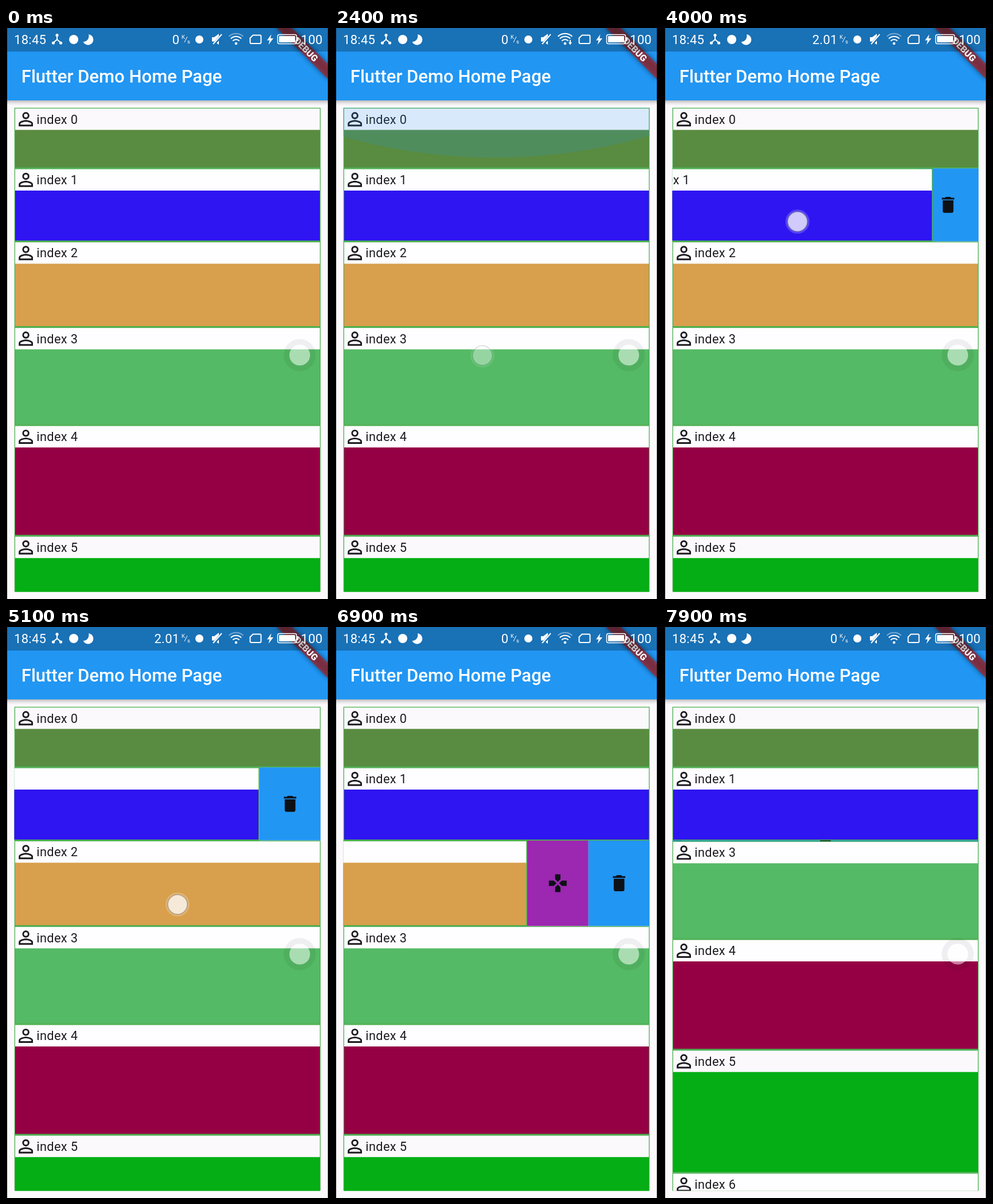
An HTML page that plays this animation: 563 by 994 pixels, repeating every 8000 ms.

```html
<!DOCTYPE html>
<html lang="en">
<head>
<meta charset="utf-8">
<title>Flutter Demo Home Page</title>
<style>
  html, body { margin: 0; width: 100%; height: 100%; overflow: hidden; background: #000; }
  svg { display: block; }
  svg svg { overflow: hidden; }
  text { font-family: Roboto, sans-serif; fill: #fff; }
  .label { font-size: 14px; letter-spacing: .25px; fill: #1d1b20; }
  .status { font-size: 22px; letter-spacing: .3px; }
  .small { font-size: 9.5px; }
  .title { font-size: 31.06px; font-weight: 500; }
  .debug { font-size: 15.84px; font-weight: 900; text-anchor: middle; }
  .line { fill: none; stroke: #fff; stroke-width: 2; }
</style>
</head>
<body>
<svg width="563" height="994" viewBox="0 0 563 994">
  <defs>
    <linearGradient id="shade" x2="0" y2="1">
      <stop offset="0" stop-opacity=".25"/>
      <stop offset=".5" stop-opacity=".09"/>
      <stop offset="1" stop-opacity="0"/>
    </linearGradient>
    <filter id="soft" x="-20%" y="-80%" width="140%" height="260%"><feGaussianBlur stdDeviation="4"/></filter>
  </defs>
  <rect width="563" height="994"/>
  <rect x="2" width="559" height="994" fill="#fcf9fc"/>

  <svg x="14" y="138.6" width="535" height="842.9">
    <g id="list" transform="translate(.42) scale(1.5528)">
      <g id="items"></g>
      <ellipse id="glow" cx="170" rx="516" fill="#2196f3"/>
    </g>
  </svg>

  <rect x="2" y="126" width="559" height="9" fill="url(#shade)"/>
  <rect x="2" width="559" height="126" fill="#2196f3"/>
  <text class="title" x="26.84" y="94.5">Flutter Demo Home Page</text>

  <svg x="2" width="559" height="994">
    <g transform="translate(559) rotate(45)">
      <rect x="-62.9" y="44.2" width="125.8" height="18.6" opacity=".5" filter="url(#soft)"/>
      <rect x="-62.9" y="44.2" width="125.8" height="18.6" fill="#b71c1c" fill-opacity=".63"/>
      <text class="debug" y="59">DEBUG</text>
    </g>
  </svg>

  <rect x="2" width="559" height="41" fill-opacity=".25"/>
  <text class="status" x="14" y="27.5">18:45</text>
  <g fill="#fff">
    <path class="line" d="M89 13V20L82 26M89 20L96 26"/>
    <circle cx="89" cy="12.5" r="2.6"/><circle cx="82.5" cy="26" r="2.6"/><circle cx="95.5" cy="26" r="2.6"/>
    <circle cx="118" cy="20" r="8"/>
    <path d="M144 11A9.3 9.3 0 1 1 134.5 24A10 10 0 0 0 144 11Z"/>
    <circle cx="337" cy="20" r="7"/>
    <path d="M359 16H363L371 10V29L363 23.5H359Z"/>
    <path d="M377 11L361 30" stroke="#1971b6" stroke-width="5"/>
    <path class="line" d="M376 11L361 28"/>
    <circle cx="401" cy="27" r="2.3"/>
    <path class="line" d="M395.3 22.5A8 8 0 0 1 406.7 22.5M391.8 18.6A13 13 0 0 1 410.2 18.6"/>
    <path id="arc" class="line" d="M388.5 14.8A18 18 0 0 1 413.5 14.8"/>
    <path id="arrow" d="M407 25h2v-4h2v4h2l-3 4.5z"/>
    <path class="line" d="M430.5 12.5H442.5Q444.5 12.5 444.5 14.5V25Q444.5 27 442.5 27H427.5Q425.5 27 425.5 25V17.5Z"/>
    <path d="M462.5 11L455 21.5H459.5L457.5 29L466 18H461Z"/>
    <rect class="line" style="stroke-width:1.5" x="473.5" y="11.5" width="33" height="16" rx="3"/>
    <rect x="476" y="14" width="28" height="11" rx="1"/>
    <rect x="507" y="16" width="2.5" height="7"/>
  </g>
  <text id="speed" class="status" x="302.5" y="27.5" text-anchor="end"></text>
  <text class="small" x="306" y="18.5">K</text>
  <path d="M311 25L316 15" stroke="#fff"/>
  <text class="small" x="316" y="27">s</text>
  <text class="status" x="514" y="27.5">100</text>

  <g transform="translate(512 569.5)">
    <circle r="23" fill="none" stroke="#000" stroke-opacity=".06" stroke-width="10"/>
    <circle r="18" fill="#fff" fill-opacity=".5"/>
  </g>
  <g id="touch">
    <circle r="21" fill="#fff" fill-opacity=".2"/>
    <circle r="17" fill="#fff" fill-opacity=".72" stroke="#888" stroke-opacity=".6" stroke-width="1.5"/>
  </g>
</svg>

<script>
const LOOP = 8000, STEP = 100, FADE = 200;
// List sizes are in dp; its group scales them to pixels
const W = 344, ACTION = W / 5, HEADER = 25;
const COLORS = ['#598b40', '#2e15f1', '#d89f4c', '#54ba65', '#950044', '#04ae14', '#888'];
const PERSON = 'M12 5.9a2.1 2.1 0 1 1 0 4.2a2.1 2.1 0 0 1 0-4.2m0 9c2.97 0 6.1 1.46 6.1 2.1v1.1H5.9V17c0-.64 3.13-2.1 6.1-2.1M12 4a4 4 0 1 0 0 8a4 4 0 0 0 0-8zm0 9c-2.67 0-8 1.34-8 4v3h16v-3c0-2.66-5.33-4-8-4z';
const TRASH = 'M6 19c0 1.1.9 2 2 2h8c1.1 0 2-.9 2-2V7H6zM19 4h-3.5l-1-1h-5l-1 1H5v2h14z';
const GAMEPAD = 'M15 7.5V2H9v5.5l3 3zM7.5 9H2v6h5.5l3-3zM9 16.5V22h6v-5.5l-3-3zM16.5 9l-3 3 3 3H22V9z';

const $ = id => document.getElementById(id);
const ramp = (t, a, b) => Math.min(1, Math.max(0, (t - a) / (b - a)));
const ease = (t, a, b) => { const p = ramp(t, a, b); return p * p * (3 - 2 * p); };
const within = (t, a, b) => t >= a && t < b;
const mix = (a, b, p) => a + (b - a) * p;

// Row offsets to the left
const slides = {
  1: t => ACTION * (ease(t, 3700, 4145) - ease(t, 5100, 5500)),
  2: t => 2 * ACTION * ease(t, 5850, 6467) + (W - 2 * ACTION) * ramp(t, 7395, 7695)
};

// Finger strokes; a tap has no end point
const strokes = [
  { from: 1900, to: 2300, start: [264, 440], end: [257, 570] },
  { from: 3700, to: 4150, start: [338, 345], end: [180, 333] },
  { from: 5100, to: 5150, start: [299, 483] },
  { from: 5800, to: 6470, start: [382, 470], end: [138, 456] },
  { from: 7200, to: 7250, start: [495, 446] }
];

function set(el, attrs) {
  for (const k in attrs) el.setAttribute(k, attrs[k]);
}

function add(parent, tag, attrs = {}, text = '') {
  const el = document.createElementNS('http://www.w3.org/2000/svg', tag);
  set(el, attrs);
  el.textContent = text;
  return parent.appendChild(el);
}

const iconAt = (cx, cy) => `translate(${cx - 12} ${cy - 12})`;

function makePane(root, height, count) {
  const pane = add(root, 'g');
  const block = (fill, d) => ({
    rect: add(pane, 'rect', { height, fill }),
    icon: add(pane, 'path', { d, fill: '#0d1116' })
  });
  const move = count > 1 ? block('#9c27b0', GAMEPAD) : null;
  return { pane, move, del: block('#2196f3', TRASH), count };
}

function makeItem(color, i) {
  const h = 68 + 14 * i;
  const box = add($('items'), 'svg', { width: W });
  const root = add(box, 'g');
  const actions = slides[i] && makePane(root, h, i);
  const front = add(root, 'g');
  const inner = (y, height, fill) => add(front, 'rect', { x: 1, y, width: W - 2, height, fill });
  add(front, 'rect', { width: W, height: h + 1, fill: '#4caf50' });
  inner(1, HEADER, i % 5 ? '#fefdff' : '#fbf9fc');
  inner(HEADER, h - HEADER - 1, color);
  add(front, 'path', { d: PERSON, fill: '#1d1b20', transform: iconAt(13, 13) });
  add(front, 'text', { class: 'label', x: 25, y: 18 }, 'index ' + i);
  return { h, box, root, front, actions, slide: slides[i] };
}

function place(block, x, width, h) {
  set(block.rect, { x, width });
  set(block.icon, { transform: iconAt(x + width / 2, h / 2) });
}

// Actions sit still behind the row; past full extent, delete takes over
function drawActions({ pane, move, del, count }, s, h) {
  pane.style.display = s > 0 ? '' : 'none';
  const extent = count * ACTION, total = Math.max(s, extent);
  const moveW = move ? total / 2 * (1 - ramp(total, extent, W)) : 0;
  if (move) place(move, W - total, moveW, h);
  place(del, W - total + moveW, total - moveW, h);
}

function drawItems(t) {
  let y = 0;
  items.forEach((item, i) => {
    const h = i === 2 ? item.h * (1 - ease(t, 7700, 7910)) : item.h;
    // A small overlap hides the seam below each row
    set(item.box, { y, height: h ? h + .3 : 0 });
    set(item.root, { transform: `translate(0 ${(h - item.h) / 2})` });
    if (item.slide) {
      const s = item.slide(t);
      set(item.front, { transform: `translate(${-s})` });
      drawActions(item.actions, s, item.h);
    }
    y += h;
  });
}

function drawGlow(t) {
  const pull = ease(t, 1900, 2350) * (1 - ramp(t, 2400, 2950));
  const size = .815 * pull;
  set($('glow'), { cy: (ACTION - 516) * size, ry: 516 * size, opacity: .16 * pull });
}

function drawTouch(t) {
  const s = strokes.find(s => within(t, s.from, s.to + FADE));
  $('touch').style.display = s ? '' : 'none';
  if (!s) return;
  const p = ramp(t, s.from, s.to);
  const [x, y] = s.start.map((v, i) => mix(v, (s.end || s.start)[i], p));
  set($('touch'), { transform: `translate(${x} ${y})`, opacity: 1 - ramp(t, s.to, s.to + FADE) });
}

function drawStatus(t) {
  $('speed').textContent = within(t, 3800, 6800) ? '2.01' : '0';
  set($('arc'), { opacity: within(t, 2200, 3400) ? 1 : .4 });
  set($('arrow'), { opacity: within(t, 2200, 3300) ? 1 : 0 });
}

const items = COLORS.map(makeItem);
const begin = performance.now();

function tick() {
  const now = (performance.now() - begin) % LOOP;
  const t = Math.floor(now / STEP) * STEP;
  drawItems(t);
  drawGlow(t);
  drawTouch(t);
  drawStatus(t);
  requestAnimationFrame(tick);
}
tick();
</script>
</body>
</html>
```
